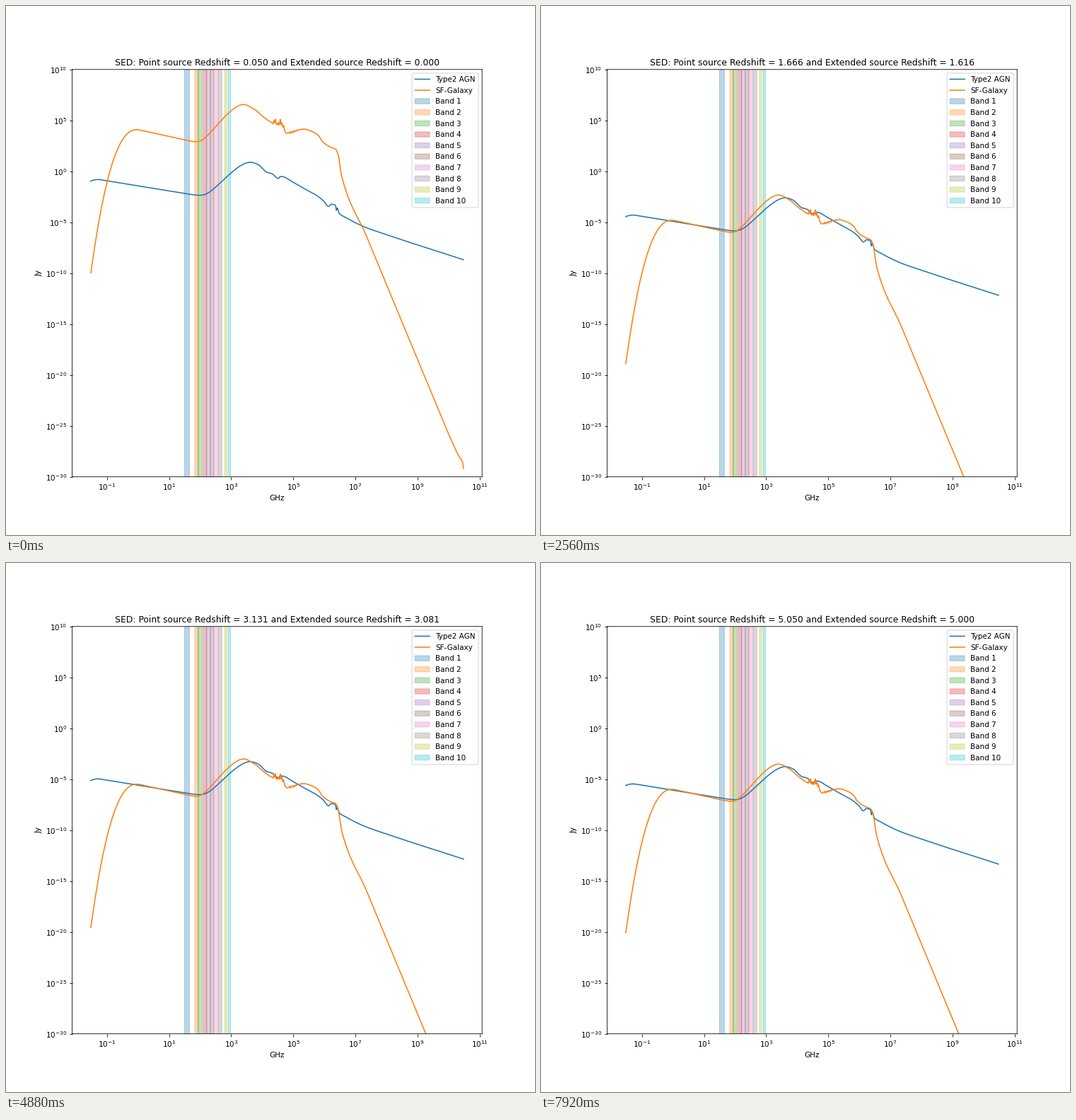
A matplotlib script for the animation above (8 s loop, 748 px wide and 748 px high).

```python
import numpy as np
import matplotlib.pyplot as plt
from matplotlib.animation import FuncAnimation

SIZE, DPI = 748, 74.8
FRAMES, STEP = 100, 80
OFFSET = 0.05  # redshift of the point source behind the extended one

# Receiver band limits in GHz.
BANDS = [(31.3, 45), (67, 90), (84, 116), (125, 163), (158, 211),
         (211, 275), (275, 373), (385, 500), (602, 720), (787, 950)]

# Key points (log GHz, log Jy) from the dust peak upwards.
AGN_HIGH = [
    (3.615, 0.89), (3.854, 0.68), (4.15, -0.09), (4.31, -0.23),
    (4.514, -0.7), (4.583, -0.51), (4.674, -0.54), (4.947, -0.99),
    (5.288, -1.59), (5.789, -2.45), (5.971, -2.91), (6.131, -3.45),
    (6.222, -3.23), (6.358, -3.35), (6.386, -3.84), (6.415, -3.6),
    (6.472, -4.11), (6.677, -4.52), (7.292, -5.46), (7.929, -6.15),
    (10.48, -8.684),
]
GALAXY_HIGH = [
    (3.398, 6.56), (3.763, 6.05), (4.036, 5.34), (4.332, 4.74),
    (4.696, 4.36), (4.73, 3.91), (4.81, 3.76), (5.015, 3.94),
    (5.334, 4.14), (5.652, 3.84), (5.834, 3.42), (5.903, 3.04),
    (6.199, 2.37), (6.358, 2.17), (6.449, 1.58), (6.506, 0.4),
    (6.563, -0.57), (7.36, -6.41), (9.341, -20.95), (10.32, -27.93),
    (10.461, -28.73), (10.478, -29.2),
]
# Emission lines of the galaxy: log GHz and height.
LINES = [(4.378, 0.25), (4.423, 0.5), (4.514, 0.25), (4.578, 0.5),
         (4.63, 0.25)]


def monotone(x, knots):
    """Shape-preserving cubic that leaves the first knot level."""
    xk, yk = np.array(knots).T
    h = np.diff(xk)
    d = np.diff(yk) / h
    a, b = d[:-1], d[1:]
    wa, wb = h[:-1] + 2 * h[1:], 2 * h[:-1] + h[1:]
    inner = np.where(a * b > 0, (wa + wb) / (wa / a + wb / b), 0)
    m = np.concatenate([[0], inner, [d[-1]]])
    i = np.clip(np.searchsorted(xk, x, side="right") - 1, 0, len(h) - 1)
    t = (x - xk[i]) / h[i]
    return (yk[i] * (1 + 2 * t) * (1 - t) ** 2
            + yk[i + 1] * t * t * (3 - 2 * t)
            + h[i] * t * (1 - t) * (m[i] * (1 - t) - m[i + 1] * t))


def radio(u, level, slope, turn, depth, power):
    """Power law, absorbed below a turnover."""
    return level - slope * u - depth * np.maximum(turn - u, 0) ** power


def dust(u, peak, level, index):
    """Modified black body with its maximum at the given point."""
    xp = index
    for _ in range(20):
        xp = index * (1 - np.exp(-xp))
    x = xp * 10 ** (u - peak)
    return level + index * (u - peak) + np.log10(np.expm1(xp) / np.expm1(x))


def spectrum(u, synchrotron, index, knots):
    """Radio plus dust up to the dust peak, key points above it."""
    peak, level = knots[0]
    low = np.minimum(u, peak)
    total = 10 ** radio(low, *synchrotron) + 10 ** dust(low, peak, level, index)
    return np.where(u < peak, np.log10(total),
                    monotone(np.maximum(u, peak), knots))


def line_forest(u):
    """Emission lines on a faint jagged ripple."""
    rng = np.random.default_rng(4)
    grid = np.linspace(4.34, 5.1, 34)
    ripple = np.interp(u, grid, rng.normal(0, 0.06, grid.size),
                       left=0, right=0)
    return ripple + sum(h * np.exp(-((u - c) / 0.014) ** 2) for c, h in LINES)


def distance(z, steps=2000):
    """Luminosity distance in a flat universe, in Hubble lengths."""
    mid = (np.arange(steps) + 0.5) / steps * z
    return (1 + z) * z * np.mean(1 / np.sqrt(0.3 * (1 + mid) ** 3 + 0.7))


def dimming(z, z0):
    return -2 * np.log10(distance(z) / distance(z0))


redshifts = np.linspace(1e-4, 5, FRAMES)
u = np.linspace(np.log10(0.03), np.log10(3e10), 6000)
agn_flux = spectrum(u, (-1.43, 0.5, -1.2, 2.8, 2), 4.2, AGN_HIGH)
gal_flux = spectrum(u, (4.097, 0.677, 0.1, 4.64, 2.45), 4.8, GALAXY_HIGH)
gal_flux += line_forest(u)

plt.rcParams["path.snap"] = False
fig, ax = plt.subplots(figsize=(SIZE / DPI, SIZE / DPI), dpi=DPI)
fig.subplots_adjust(left=0.125, right=0.9, bottom=0.11, top=0.88)

agn, = ax.plot(10 ** u, 10 ** agn_flux, label="Type2 AGN")
galaxy, = ax.plot(10 ** u, 10 ** gal_flux, label="SF-Galaxy")
for i, (low, high) in enumerate(BANDS):
    ax.axvspan(low, high, color=f"C{i}", alpha=0.3, label=f"Band {i + 1}")

margin = 0.05 * (u[-1] - u[0])
ax.set_xscale("log")
ax.set_yscale("log")
ax.set_xlim(10 ** (u[0] - margin), 10 ** (u[-1] + margin))
ax.set_ylim(1e-30, 1e10)
ax.minorticks_off()
ax.set_xlabel("GHz")
ax.set_ylabel("Jy")
ax.legend(loc="upper right", labelspacing=0.54)
title = ax.set_title("", fontsize=11.9)


def update(frame):
    z = redshifts[frame]
    point = z + OFFSET
    agn.set_ydata(10 ** (agn_flux + dimming(point, redshifts[0] + OFFSET)))
    galaxy.set_ydata(10 ** (gal_flux + dimming(z, redshifts[0])))
    title.set_text(f"SED: Point source Redshift = {point:.3f} "
                   f"and Extended source Redshift = {z:.3f}")
    return agn, galaxy, title


anim = FuncAnimation(fig, update, frames=FRAMES, interval=STEP,
                     repeat=True, repeat_delay=0)
plt.show()
```
